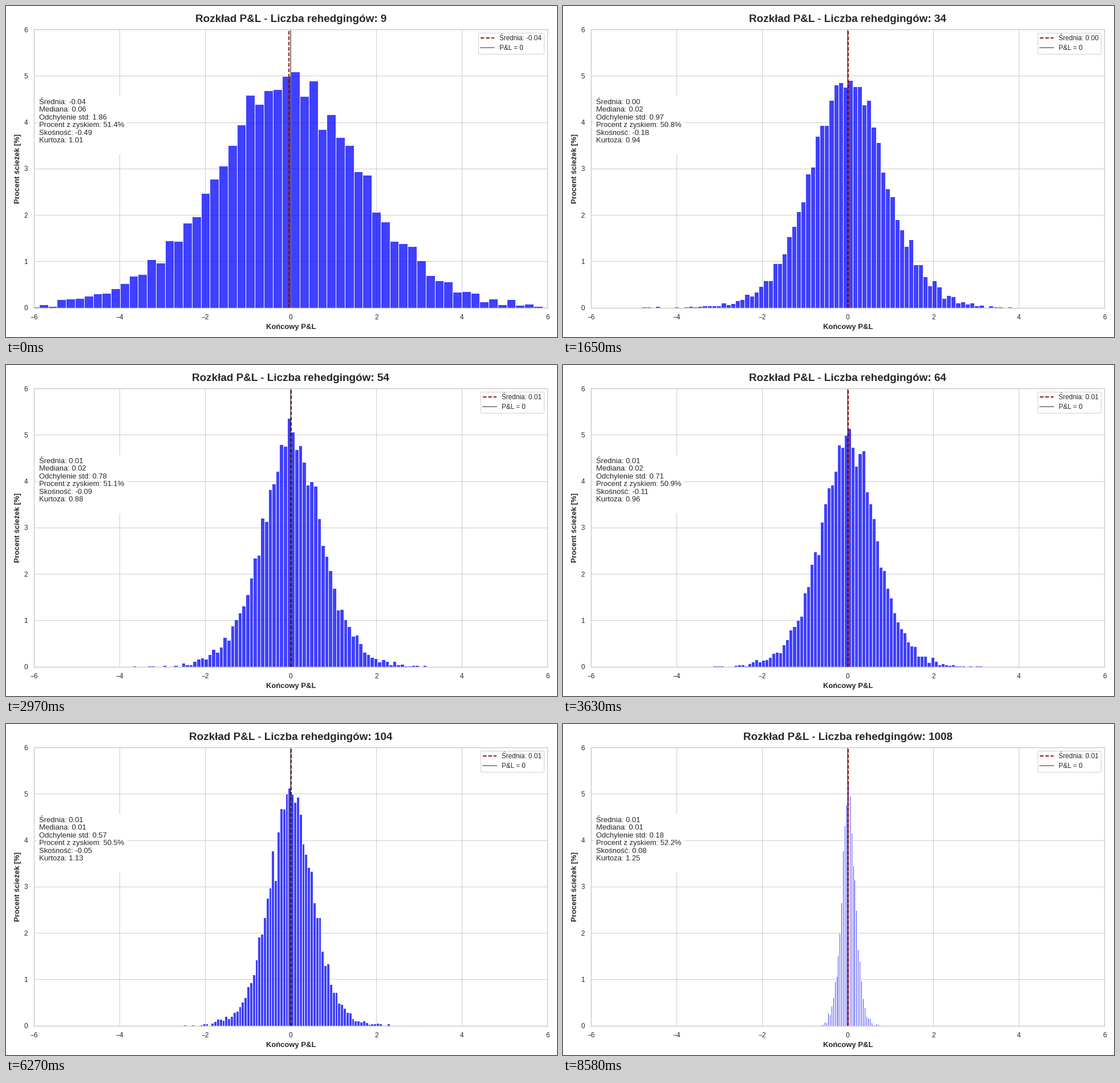
A matplotlib script for the animation above (9240 ms loop, 966 by 580 pixels).

```python
import numpy as np
import matplotlib.pyplot as plt
from matplotlib.animation import FuncAnimation

W, H, DPI = 966, 580, 85
PX = 72 / DPI  # one pixel in points
HEDGES = list(range(9, 125, 5)) + [252, 504, 1008]
PATHS = 10_000
INK, GRID = "0.15", "0.8"

# Key points of each statistic over the number of hedges
KEYS = np.log([9, 24, 34, 54, 79, 104, 1008])
MEAN = [-0.04, -0.01, 0.004, 0.008, 0.008, 0.008, 0.008]
MEDIAN = [0.06, 0.03, 0.02, 0.02, 0.01, 0.01, 0.01]
STD = [1.86, 1.14, 0.97, 0.78, 0.64, 0.57, 0.18]
PROFIT = [51.4, 51.0, 50.8, 51.1, 50.7, 50.5, 52.2]
SKEW = [-0.49, -0.25, -0.18, -0.09, -0.14, -0.05, 0.08]
KURTOSIS = [1.01, 0.94, 0.94, 0.88, 1.07, 1.13, 1.25]


def stats_for(n):
    """Mean, median, std, % in profit, skewness and kurtosis."""
    at = np.log(n)
    mean, median, profit, skew, kurt = (
        np.interp(at, KEYS, row)
        for row in (MEAN, MEDIAN, PROFIT, SKEW, KURTOSIS))
    std = np.exp(np.interp(at, KEYS, np.log(STD)))
    return mean, median, std, profit, skew, kurt


def histogram(n, median, std, skew):
    """Left edges, heights in percent and width of the bars.

    The shape is a Student t curve with 10 degrees of freedom, its two
    sides scaled apart by the skewness, with counting noise.
    """
    width = 0.113 * std
    left = np.arange(-50, 50) * width
    x = left + width / 2 - median
    scale = np.sqrt(0.8) * std * (1 + 0.12 * skew * np.sign(x))
    peak = 0.435 * width / std
    share = peak * (1 + (x / scale) ** 2 / 10) ** -5.5
    heights = np.random.default_rng(n).poisson(share * PATHS) * 100 / PATHS
    shown = (heights > 0) & (np.abs(left) < 6.5)
    return left[shown], heights[shown], width


def fmt(value):
    return f"{round(value, 2) + 0.0:.2f}"


plt.rcParams.update({
    "font.family": "Liberation Sans",
    "text.color": INK,
    "axes.labelcolor": INK,
    "xtick.color": INK,
    "ytick.color": INK,
    "axes.edgecolor": GRID,
    "axes.linewidth": 1.25,
    "axes.axisbelow": True,
    "grid.color": GRID,
    "grid.linewidth": PX,
})

fig = plt.figure(figsize=((W + 1e-4) / DPI, (H + 1e-4) / DPI), dpi=DPI,
                 facecolor="white")
ax = fig.add_axes([49.3 / W, 51.4 / H, 900 / W, 487.4 / H])
ax.set(xlim=(-6, 6), ylim=(0, 6), xticks=range(-6, 7, 2), yticks=range(7))
ax.grid(True)
ax.tick_params(bottom=False, left=False, length=6, pad=3.5, labelsize=10)
ax.set_xlabel("Końcowy P&L", fontsize=11, fontweight="bold")
ax.set_ylabel("Procent ścieżek [%]", fontsize=11, fontweight="bold")
title = ax.set_title("", fontsize=16, fontweight="bold", pad=11.5)

mean_line = ax.axvline(0, color="darkred", ls="--", lw=1.5, label="Średnia")
ax.axvline(0, color="black", alpha=0.5, lw=1.5, label="P&L = 0")
legend = ax.legend(loc="upper right", fontsize=10, borderpad=0.35,
                   labelspacing=0.4)
info = ax.text(0.01, 0.75, "", transform=ax.transAxes, fontsize=11, va="top",
               linespacing=1.16,
               bbox=dict(facecolor="white", edgecolor="none"))
bars = []


def update(frame):
    n = HEDGES[min(frame, len(HEDGES) - 1)]
    mean, median, std, profit, skew, kurt = stats_for(n)

    while bars:
        bars.pop().remove()
    left, heights, width = histogram(n, median, std, skew)
    bars.append(ax.bar(left, heights, width, align="edge", lw=PX,
                       facecolor=(0, 0, 1, 0.75), edgecolor="white"))

    title.set_text(f"Rozkład P&L - Liczba rehedgingów: {n}")
    mean_line.set_xdata([mean, mean])
    legend.get_texts()[0].set_text(f"Średnia: {fmt(mean)}")
    info.set_text(
        f"Średnia: {fmt(mean)}\n"
        f"Mediana: {fmt(median)}\n"
        f"Odchylenie std: {fmt(std)}\n"
        f"Procent z zyskiem: {profit:.1f}%\n"
        f"Skośność: {fmt(skew)}\n"
        f"Kurtoza: {fmt(kurt)}\n"
    )


# The last histogram is held for two frames.
anim = FuncAnimation(fig, update, frames=len(HEDGES) + 1, interval=330,
                     repeat=True, repeat_delay=0, blit=False)
plt.show()
```
